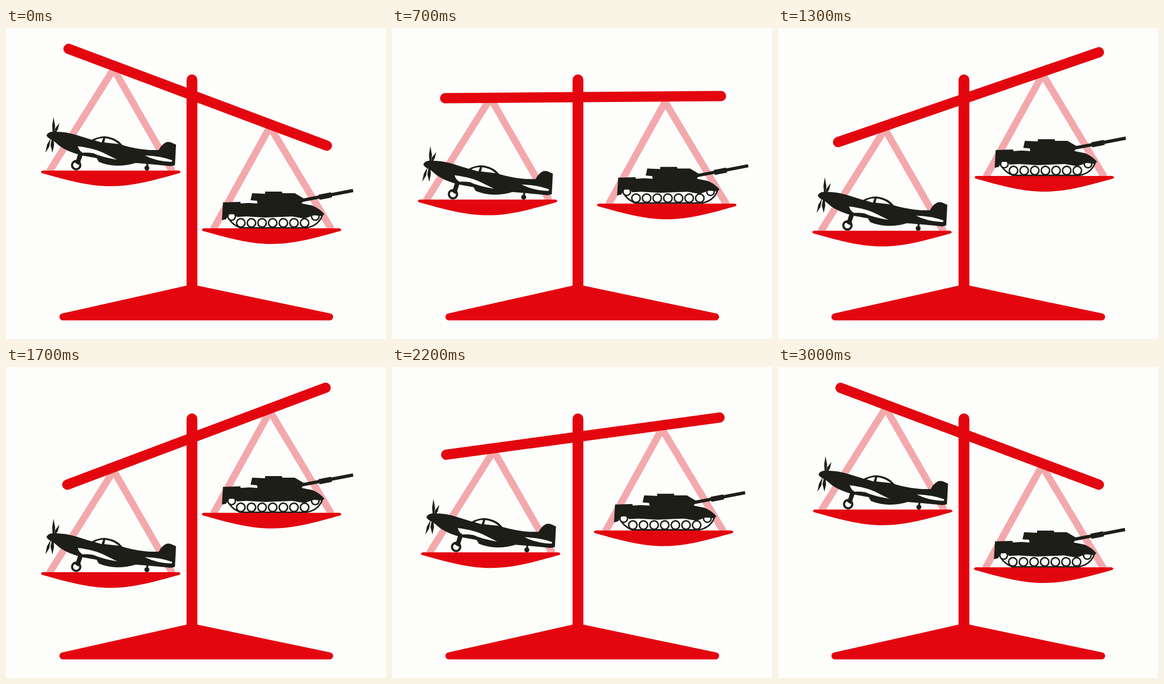
An HTML page that plays this animation: 704 px wide and 576 px high, repeating every 3.1 s.

```html
<!DOCTYPE html>
<html lang="en">
<head>
<meta charset="utf-8">
<title>Balance</title>
<style>
  html, body { margin: 0; width: 100%; height: 100%; overflow: hidden; background: #fdfdfc; }
  svg { display: block; width: 704px; height: 576px; }
  .red { fill: #e3060f; }
  .ink { fill: #1d1e18; }
  .bg { fill: #fdfdfc; }
  .line { fill: none; stroke: #1d1e18; }
  .ring { fill: #fdfdfc; stroke: #1d1e18; stroke-width: 2.7; }
  .cord { fill: none; stroke: #f3a9ac; stroke-width: 13; stroke-linejoin: round; }
</style>
</head>
<body>
<svg viewBox="0 0 704 576">
  <defs>
    <path id="dish" class="red" d="M2 0H254Q260 2 255 5C204 19 169 29 128 29S52 19 1 5Q-4 2 2 0Z"/>
  </defs>

  <g id="left">
    <path class="cord" d="M80 266L199.500 76L308.500 266"/>
    <use href="#dish" x="66" y="264"/>
    <g class="ink">
      <path d="M75 199Q77 193 86 192Q108 191 130 198L159 207Q170 201 183 200.500Q199 202 209 210L216 217Q240 224 266 226L283 226Q288 216 296 212Q300 210 306 212L315 216L313 254Q307 257 297 255L265 252L240 250Q225 255 205 255Q186 254 172 248L168 241L140 236Q114 229 100 219L87 208Q78 205 75 199Z"/>
      <path d="M88 165L91 181L89 199H87L85.500 181ZM99 176L96 188L89 199L91 186ZM83 204L80 220L73 231L76 216ZM85 204H88L89 217L86 231L82.500 217Z"/>
      <path d="M134 232L142 235L137 250L129 248Z"/>
      <path d="M260 250H264L263 258H260Z"/>
      <circle cx="261" cy="259.500" r="4.600"/>
    </g>
    <circle class="ring" cx="130" cy="254" r="7.700" style="stroke-width:4"/>
    <path class="ink" d="M124 247L136 244L135 254Z"/>
    <g class="bg">
      <path d="M133 219Q165 223 184 233L206 244Q177 239 162 232Q150 230 142 231Q135 227 133 219Z"/>
      <path d="M257 236Q287 237 308 245L307 248Q278 247 257 236Z"/>
      <path d="M164 208Q172 204 180 204L177 212ZM184 204Q199 206 209 215L182 212Z"/>
    </g>
  </g>

  <g id="right">
    <path class="cord" d="M384 373L489 183L603 373"/>
    <use href="#dish" x="364" y="371"/>
    <path class="ring" d="M409 346Q416 363 434 370H557Q579 366 586 347Z"/>
    <g id="wheels">
      <circle class="ring" cx="418" cy="349" r="7"/>
      <circle class="ring" cx="573" cy="349" r="7"/>
    </g>
    <path class="ink" d="M400 356L402 323L434 322L435 325L450 324L466 325L465 320L453 319L456 306L480 307V303H511L512 306L535 306L552 316L548 325L568 329Q582 335 590 345L585 348L570 347L553 353L530 349L480 351L445 349L428 350L424 345H412L408 354Z"/>
    <path class="line" stroke-width="6" d="M547 319.500L643 301"/>
    <path class="line" stroke-width="9.500" d="M580 313.500L603 309"/>
  </g>

  <g id="beam">
    <rect class="red" x="89" y="118.500" width="530" height="19" rx="9.500"/>
  </g>
  <g class="red">
    <rect x="334.500" y="86" width="20" height="420" rx="10"/>
    <path d="M105 528.500L335 477H354L600 528.500A6.500 6.500 0 0 1 599 541.500H106A6.500 6.500 0 0 1 105 528.500Z"/>
  </g>
</svg>
<script>
  const LOOP = 3100, STEP = 100;
  // time in ms, tilt of the beam and of the pans: 1 is right side down, -1 left side down
  const keys = [[0, 1, 1], [40, 1, 1], [700, -0.022, 0.055], [1300, -0.925, -0.925],
    [1380, -1, -1], [1800, -1, -1], [2200, -0.377, -0.377], [2600, 0.343, 0.343],
    [2980, 1, 1], [LOOP, 1, 1]];
  const el = id => document.getElementById(id);
  const move = (id, value) => el(id).setAttribute('transform', value);

  for (let i = 0; i < 7; i++) {
    const wheel = document.createElementNS('http://www.w3.org/2000/svg', 'circle');
    wheel.setAttribute('class', 'ring');
    wheel.setAttribute('cx', 435 + i * 19.7);
    wheel.setAttribute('cy', 361);
    wheel.setAttribute('r', 7.8);
    el('wheels').append(wheel);
  }

  function tiltAt(t) {
    const i = keys.findIndex(k => k[0] > t);
    const from = keys[i - 1], to = keys[i];
    const p = (t - from[0]) / (to[0] - from[0]);
    return [1, 2].map(n => from[n] + (to[n] - from[n]) * p);
  }

  function draw() {
    const t = Math.floor((performance.now() + 8) / STEP) * STEP % LOOP;
    const [beam, pan] = tiltAt(t);
    const out = 1 - Math.abs(pan);
    move('beam', `rotate(${20.55 * beam} 353.8 131.3)`);
    move('left', `translate(${-18 * out} ${57 - pan * (pan > 0 ? 57 : 59)})`);
    move('right', `translate(${18 * out} ${-48.5 + pan * (pan > 0 ? 48.5 : 52.5)})`);
    requestAnimationFrame(draw);
  }
  draw();
</script>
</body>
</html>
```
